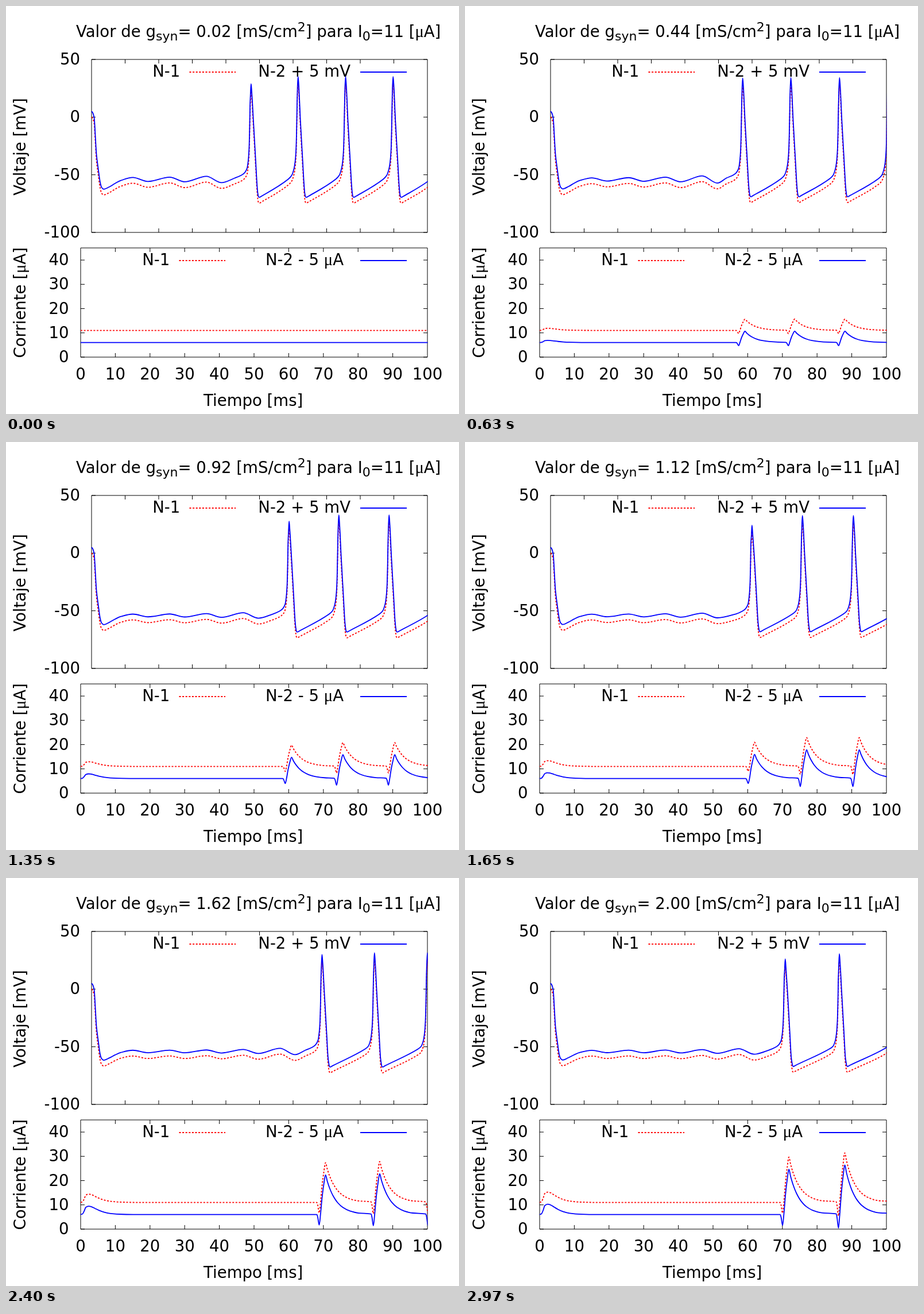
Animation of 789x710 px, one loop 3 s. Source, as an HTML page:

```html
<!DOCTYPE html>
<html lang="es">
<head>
<meta charset="utf-8">
<style>
  html, body { margin: 0; width: 100%; height: 100%; overflow: hidden; background: #fff; }
  svg { display: block; }
  text { font: 27.57px "DejaVu Sans", Verdana, sans-serif; white-space: pre; }
  .small { font-size: 22px; }
  .mu { font-family: "Liberation Serif", "Noto Serif", serif; font-size: 28.5px; }
  .axis { fill: none; stroke: #000; stroke-width: 1; }
  .n1, .n2 { fill: none; stroke-width: 1.8; stroke-linejoin: round; }
  .n1 { stroke: #f00; stroke-dasharray: 3 2.6; }
  .n2 { stroke: #00f; }
</style>
</head>
<body>
<svg id="stage" width="789" height="710" viewBox="0 0 789 710">
  <clipPath id="clip"><rect x="128" y="92" width="606.5" height="520"/></clipPath>
  <text x="122" y="54">Valor de g<tspan class="small" dy="6">syn</tspan><tspan dy="-6">= </tspan><tspan id="value">0.02</tspan> [mS/cm<tspan class="small" dy="-10">2</tspan><tspan dy="10">] para I</tspan><tspan class="small" dy="6">0</tspan><tspan dy="-6">=11 [</tspan><tspan class="mu">μ</tspan>A]</text>
  <text x="430.7" y="696" text-anchor="middle">Tiempo [ms]</text>
  <text transform="translate(34 245) rotate(-90)" text-anchor="middle">Voltaje [mV]</text>
  <text transform="translate(34 516.3) rotate(-90)" text-anchor="middle">Corriente [<tspan class="mu">μ</tspan>A]</text>
  <text x="303.3" y="123" text-anchor="end">N-1</text>
  <text x="600" y="123" text-anchor="end">N-2 + 5 mV</text>
  <text x="285.3" y="451" text-anchor="end">N-1</text>
  <text x="588" y="451" text-anchor="end">N-2 - 5 <tspan class="mu">μ</tspan>A</text>
  <path class="n1" d="M319.5 115H400M301.5 443H382"/>
  <path class="n2" d="M617 115H698M617 443H698"/>
  <g id="axes"></g>
  <g clip-path="url(#clip)">
    <path id="v1" class="n1"/><path id="v2" class="n2"/>
    <path id="i1" class="n1"/><path id="i2" class="n2"/>
  </g>
</svg>
<script>
const $ = id => document.getElementById(id);
const volt = { left: 149, top: 93, bottom: 394, zero: 193.33, sx: 5.85, sy: 301 / 150 };
const curr = { left: 130, top: 421, bottom: 611, zero: 611, sx: 6.04, sy: 190 / 45 };
const px = (plot, t) => plot.left + t * plot.sx;
const py = (plot, v) => plot.zero - v * plot.sy;

function drawAxes(plot, values, labelX) {
  const { left, top, bottom } = plot, right = 734;
  let d = `M${left} ${top}H${right}V${bottom}H${left}Z`, labels = "";
  for (let t = 10; t < 100; t += 10) {
    const x = px(plot, t);
    d += `M${x} ${top}v7M${x} ${bottom}v-7`;
  }
  for (const v of values) {
    const y = py(plot, v);
    d += `M${left} ${y}h7M${right} ${y}h-7`;
    labels += `<text x="${labelX}" y="${Math.round(y) + 9}" text-anchor="end">${v}</text>`;
  }
  $("axes").innerHTML += `<path class="axis" d="${d}"/>${labels}`;
}

// Monotone cubic through the points, written as Bezier segments.
function curve(plot, points, shift) {
  const p = points.map(([t, v]) => [px(plot, t), py(plot, v + shift)]);
  const slope = p.slice(1).map((q, i) => (q[1] - p[i][1]) / (q[0] - p[i][0]));
  const m = p.map((_, i) => {
    const a = slope[i - 1] ?? slope[i], b = slope[i] ?? a;
    return a * b > 0 ? 2 * a * b / (a + b) : 0;
  });
  let d = "M" + p[0].map(n => n.toFixed(2));
  for (let i = 1; i < p.length; i++) {
    const [x0, y0] = p[i - 1], [x1, y1] = p[i], h = (x1 - x0) / 3;
    d += "C" + [x0 + h, y0 + h * m[i - 1], x1 - h, y1 - h * m[i], x1, y1].map(n => n.toFixed(2));
  }
  return d;
}

// Small cycles before firing, closeness to gaining one more, first spike time.
function onset(g) {
  if (g < .365) return { cycles: 3, u: (g + .6) / .96, first: 47.4 + 4.5 * g + 7 * g * g };
  if (g < 1.305) {
    const x = g - .37;
    return { cycles: 4, u: Math.max(0, x) / .93, first: 57.1 + 1.2 * x + 3.5 * x * x };
  }
  const x = g - 1.31;
  return { cycles: 5, u: Math.max(0, x) / 1.35, first: 68.3 + 3.3 * x * x };
}

function spikeTimes(g, first) {
  const gap = 14.08 + .75 * g + .16 * g * g, times = [first];
  for (let t = first + gap - .1; t < 118; t += gap + .05) times.push(t);
  return times;
}

function voltage(g, { cycles, u }, times, drop) {
  const pts = [[0, 0], [.35, -1.2], [.8, -6], [1.1, -20], [1.45, -37], [2, -50], [2.6, -62],
    [3, -66 + .4 * g], [3.6, -67.5 + .5 * g], [5.3, -65.5 + .5 * g], [7, -62.5 + .25 * g], [8.7, -60]];
  const base = .9 + .55 * Math.exp(-g / .5);
  for (let k = 0; k < cycles; k++) {
    const a = base + (2 - 1.25 * u) * .42 ** (cycles - 1 - k), t = 12.3 + 10.95 * k;
    pts.push([t, -59 + a], [t + 4.5, -59.2 - a]);
  }
  const low = -74.6 + 1.25 * g;
  times.forEach((T, i) => {
    const top = 30.2 - 2.3 * g - (i ? 0 : drop);
    const rise = i ? [[-2.9, -58.8 + g], [-1.9, -55.6 + .5 * g]]
      : [[-4.8, -57.8], [-2.9, -55.4], [-1.9, -53.2]];
    const shape = [...rise, [-1.2, -49.5], [-.85, -43], [-.6, -33], [-.45, -18], [-.31, 4],
      [-.17, top - 9], [0, top], [.2, top - 7], [.68, -7.3], [1.37, -42.7], [1.8, -64.6],
      [2, low + 3.5], [2.2, low + .6], [2.45, low], [3.1, low + 1]];
    for (const [dt, v] of shape) pts.push([T + dt, v]);
  });
  return pts;
}

function current(g, times, drop) {
  const pts = [[0, 0], [.5, .06], [1, .4], [1.5, .87], [2.3, 1], [3.1, .94], [4.2, .72],
    [5.3, .5], [6.8, .28], [8.6, .13], [12, .03], [16, 0]].map(([t, f]) => [t, 11 + 2.15 * g * f]);
  let rest = 0;
  times.forEach((T, i) => {
    const d = i ? 0 : drop;
    const peak = g * (11.4 - .55 * g) * (1 - .019 * d);
    const dip = g * (3.2 - .2 * g) * (1 - .045 * d);
    const add = (dt, v) => pts.push([T + dt, 11 + v]);
    add(-.5, rest);
    add(-.25, rest - .25 * dip);
    add(.18, -dip);
    add(.55, 0);
    add(1, .42 * peak);
    add(1.5, .76 * peak);
    for (const s of [0, .5, 1.2, 2.2, 3.5, 5, 7, 9.5]) add(2 + s, peak * Math.exp(-s / 2.9));
    rest = peak * Math.exp(-12 / 2.9);
  });
  return pts;
}

function draw(step) {
  const g = .02 * (step + 1), state = onset(g);
  const times = spikeTimes(g, state.first), drop = 11.5 * state.u ** 1.4;
  const v = voltage(g, state, times, drop);
  const i = current(g - .02, times, drop); // the current starts uncoupled
  $("value").textContent = g.toFixed(2);
  $("v1").setAttribute("d", curve(volt, v, 0));
  $("v2").setAttribute("d", curve(volt, v, 5));
  $("i1").setAttribute("d", curve(curr, i, 0));
  $("i2").setAttribute("d", curve(curr, i, -5));
}

drawAxes(volt, [50, 0, -50, -100], 129);
drawAxes(curr, [0, 10, 20, 30, 40], 109.5);
for (let t = 0; t <= 100; t += 10)
  $("axes").innerHTML += `<text x="${px(curr, t)}" y="650" text-anchor="middle">${t}</text>`;

let shown = -1;
function tick() {
  const step = Math.floor(performance.now() / 30) % 100;
  if (step !== shown) draw(shown = step);
  requestAnimationFrame(tick);
}
tick();
</script>
</body>
</html>
```
